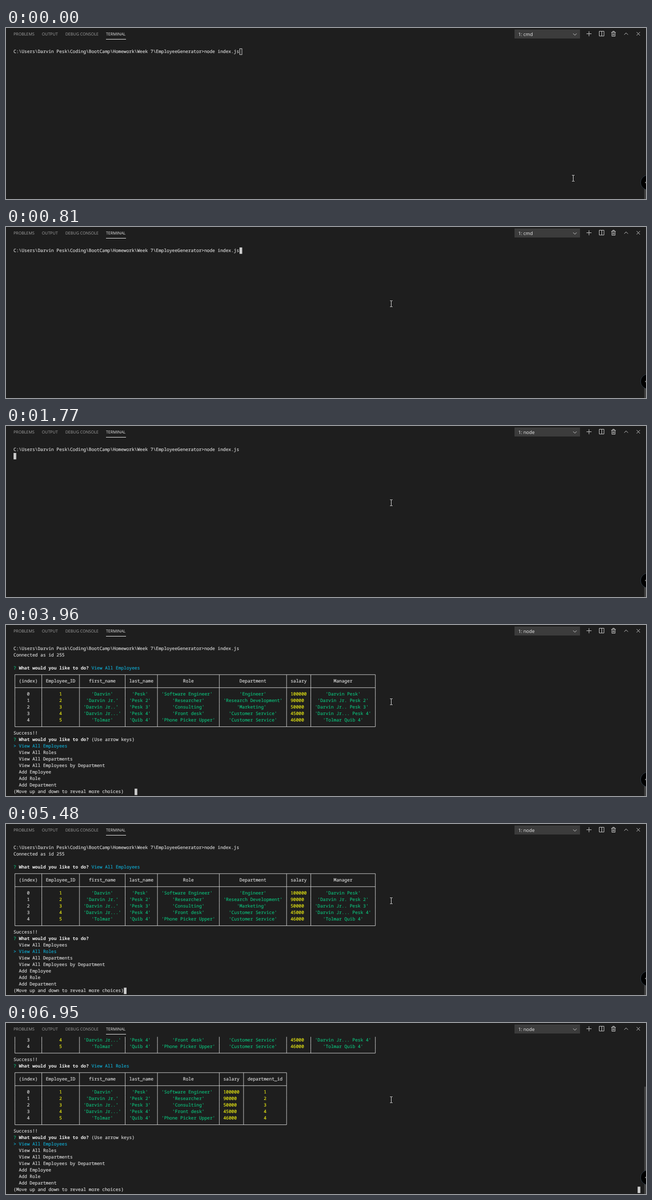
An HTML page that plays this animation: 1280 px wide and 342 px high, repeating every 8 s.

```html
<!DOCTYPE html>
<html lang="en">
<head>
<meta charset="utf-8">
<title>Terminal session</title>
<style>
  html, body { margin: 0; width: 100%; height: 100%; overflow: hidden; background: #1e1e1e; }
  svg { display: block; width: 100%; height: 100%; }
  text { white-space: pre; text-rendering: geometricPrecision; }
  .term { font: 8.967px "Noto Sans Mono", "DejaVu Sans Mono", monospace; color: #d8d8d8; }
  .term text { fill: currentColor; stroke: currentColor; stroke-width: 0.2; }
  .term .bold { font-weight: 700; color: #f2f2f2; stroke: none; }
  .term .green { color: #0dbc79; }
  .term .yellow { color: #e8e814; }
  .term .cyan { color: #11a8cd; }
  .rule { fill: none; stroke: #cccccc; stroke-width: 1; }
  .tabs { font: 8.1px "Open Sans", "Noto Sans", sans-serif; fill: #a2a2a2; }
  .tabs .active { fill: #e7e7e7; }
  .picker { font: 9.4px "Open Sans", "Noto Sans", sans-serif; fill: #f0f0f0; }
  .icon { fill: none; stroke: #cccccc; stroke-width: 1; }
</style>
</head>
<body>
<svg id="stage" viewBox="0 0 1280 342">
  <rect width="1280" height="342" fill="#1e1e1e"/>
  <g class="tabs">
    <text x="15" y="15.3">PROBLEMS</text>
    <text x="71.7" y="15.3">OUTPUT</text>
    <text x="118.7" y="15.3">DEBUG CONSOLE</text>
    <text x="200" y="15.3" class="active">TERMINAL</text>
    <rect x="200" y="22" width="40" height="1" class="active"/>
  </g>
  <rect x="1017" y="3" width="131" height="18" fill="#3c3c3c"/>
  <text id="shell" class="picker" x="1024.5" y="15.7"></text>
  <g class="icon">
    <path d="M1134.3 11l3.5 3.5l3.5 -3.5"/>
    <path d="M1161 11.5h10M1166 6.5v10"/>
    <path d="M1186.5 6.5h9.5v9.5h-9.5zM1191.5 6.5v9.5"/>
    <path d="M1210.5 8.5h9M1213.5 8v-1.5h3v1.5M1211.8 8.5v8h6.4v-8M1214 10.5v4.5M1216 10.5v4.5"/>
    <path d="M1236.5 13.5l3.7 -3.7l3.7 3.7"/>
    <path d="M1261.3 8.3l6.6 6.6M1267.9 8.3l-6.6 6.6"/>
  </g>
  <g id="screen" class="term"></g>
  <rect id="caret"/>
  <rect id="slider" x="1276.5" width="3.5" fill="#434343"/>
  <circle cx="1284" cy="309" r="14.8" fill="#000" stroke="#3a4a58" stroke-width="0.8"/>
  <path d="M1280 307.5l-1.5 1.5l1.5 1.5" fill="none" stroke="#ddd"/>
  <path id="mouse" d="M-2.5 -6h2l.5 .5l.5 -.5h2M-2.5 6h2l.5 -.5l.5 .5h2M0 -5.5v11" fill="none" stroke="#e0e0e0"/>
</svg>
<script>
const LOOP = 8000;
const CELL = 5.38, LINE = 13.02, LEFT = 15.1, MIDDLE = 47.2;
const $ = id => document.getElementById(id);
const colX = col => LEFT + col * CELL;
const rowY = row => MIDDLE + row * LINE;

function set(node, attrs) {
  for (const key in attrs) node.setAttribute(key, attrs[key]);
}
function add(parent, tag, attrs, content = "") {
  const node = document.createElementNS("http://www.w3.org/2000/svg", tag);
  set(node, attrs);
  node.textContent = content;
  return parent.appendChild(node);
}

const COMMAND = "C:\\Users\\Darvin Pesk\\Coding\\BootCamp\\Homework\\Week 7\\EmployeeGenerator>node index.js";
const CHOICES = ["View All Employees", "View All Roles", "View All Departments",
  "View All Employees by Department", "Add Employee", "Add Role", "Add Department"];
const HINT = "(Use arrow keys)";

const quote = s => `'${s}'`;
const people = [
  ["Darvin", "Pesk", "Software Engineer", "Engineer", 100000, 1],
  ["Darvin Jr.", "Pesk 2", "Researcher", "Research Development", 90000, 2],
  ["Darvin Jr..", "Pesk 3", "Consulting", "Marketing", 50000, 3],
  ["Darvin Jr...", "Pesk 4", "Front desk", "Customer Service", 45000, 4],
  ["Tolmar", "Quib 4", "Phone Picker Upper", "Customer Service", 46000, 4]
].map(([first, last, role, dept, salary, deptId], i) => ({
  "(index)": String(i), Employee_ID: i + 1, first_name: quote(first), last_name: quote(last),
  Role: quote(role), Department: quote(dept), salary, department_id: deptId,
  Manager: quote(`${first} ${last}`)
}));
const SHARED = ["(index)", "Employee_ID", "first_name", "last_name", "Role"];
const EMPLOYEE_COLUMNS = [...SHARED, "Department", "salary", "Manager"];
const ROLE_COLUMNS = [...SHARED, "salary", "department_id"];

// A page of terminal output, scrolled up by a number of rows.
function makePage(scroll, write) {
  const group = add($("screen"), "g", {});
  const visible = row => row - scroll >= -1 && row - scroll <= 22;

  function put(row, col, str, cls = "") {
    if (visible(row)) add(group, "text", { x: colX(col), y: rowY(row - scroll) + 2.5, class: cls }, str);
  }
  function prompt(row, answer, cls) {
    put(row, 0, "?", "green");
    put(row, 2, "What would you like to do?", "bold");
    put(row, 29, answer, cls);
  }
  function menu(row, selected, hint) {
    prompt(row, hint);
    CHOICES.forEach((choice, i) => {
      const on = i === selected;
      if (on) put(row + 1 + i, 0, ">", "cyan");
      put(row + 1 + i, 2, choice, on ? "cyan" : "");
    });
    put(row + 8, 0, "(Move up and down to reveal more choices)");
  }
  function table(top, columns) {
    const widths = columns.map(c => 2 + Math.max(c.length, ...people.map(p => String(p[c]).length)));
    const edges = [0];
    widths.forEach((w, i) => edges.push(edges[i] + w + 1));
    const bars = edges.map(e => colX(e + 0.5));
    const half = LINE / 2;

    function rules(row, up, down, across) {
      if (!visible(row)) return;
      const y = rowY(row - scroll);
      let d = bars.map(x => `M${x} ${y - up}V${y + down}`).join("");
      if (across) d += `M${bars[0]} ${y}H${bars[bars.length - 1]}`;
      add(group, "path", { d, class: "rule" });
    }
    function cells(row, values, colour) {
      rules(row, half, half, false);
      values.forEach((value, i) => {
        const str = String(value);
        const pad = Math.floor((widths[i] - str.length) / 2);
        put(row, edges[i] + 1 + pad, str, colour(value));
      });
    }
    rules(top, 0, half, true);
    cells(top + 1, columns, () => "");
    rules(top + 2, half, half, true);
    people.forEach((p, i) => cells(top + 3 + i, columns.map(c => p[c]),
      v => typeof v === "number" ? "yellow" : v[0] === "'" ? "green" : ""));
    rules(top + 8, half, 0, true);
    put(top + 9, 0, "Success!!");
  }

  put(0, 0, COMMAND);
  write({ put, prompt, menu, table });
  return group;
}

function connected(p) { p.put(1, 0, "Connected as id 255"); }
function employees(p) {
  connected(p);
  p.prompt(3, CHOICES[0], "cyan");
  p.table(4, EMPLOYEE_COLUMNS);
}
function roles(p) {
  employees(p);
  p.prompt(14, CHOICES[1], "cyan");
  p.table(15, ROLE_COLUMNS);
  p.menu(25, 0, HINT);
}

const state = (start, row, col, scroll, write) =>
  ({ start, row, col, scroll, page: makePage(scroll, write) });
const states = [
  state(0, 0, 84, 0, () => {}),
  state(1710, 1, 0, 0, () => {}),
  state(2190, 2, 0, 0, connected),
  state(2290, 11, 45, 0, p => { connected(p); p.menu(3, 0, HINT); }),
  state(3960, 22, 45, 0, p => { employees(p); p.menu(14, 0, HINT); }),
  state(5480, 22, 41, 0, p => { employees(p); p.menu(14, 1, ""); }),
  state(6910, 22, 232, 10, roles),
  state(6950, 22, 232, 11, roles)
];

function mouseAt(t) {
  if (t >= 710 && t < 760) return [775.5, 155.5];
  if (t >= 760 && t < 810) return [772.5, 154.5];
  const step = t < 20 ? 0 : Math.min(13, Math.floor((t - 20) / 45) + 1);
  const k = step / 13, eased = k * k * (3 - 2 * k);
  return [1134.5 - 364 * eased, 300.5 - 147 * eased].map(v => Math.round(v - 0.5) + 0.5);
}

function render(t) {
  const now = states.filter(s => s.start <= t).pop();
  for (const s of states) s.page.style.display = s === now ? "" : "none";
  $("shell").textContent = t < 1770 ? "1: cmd" : "1: node";

  const focused = t >= 810;
  const inset = focused ? 0 : 0.5;
  set($("caret"), {
    x: colX(now.col) + inset,
    y: rowY(now.row) - 6.3 + inset,
    width: CELL - 2 * inset,
    height: 12.8 - 2 * inset,
    fill: focused ? "#cccccc" : "none",
    stroke: focused ? "none" : "#cccccc"
  });

  const top = now.scroll ? 342 - 313 * 24 / (24 + now.scroll) : 322;
  set($("slider"), { y: top, height: 342 - top });
  set($("mouse"), { transform: `translate(${mouseAt(t)})` });
}

const began = performance.now();
function tick() {
  render((performance.now() - began) % LOOP);
  requestAnimationFrame(tick);
}
tick();
</script>
</body>
</html>
```
